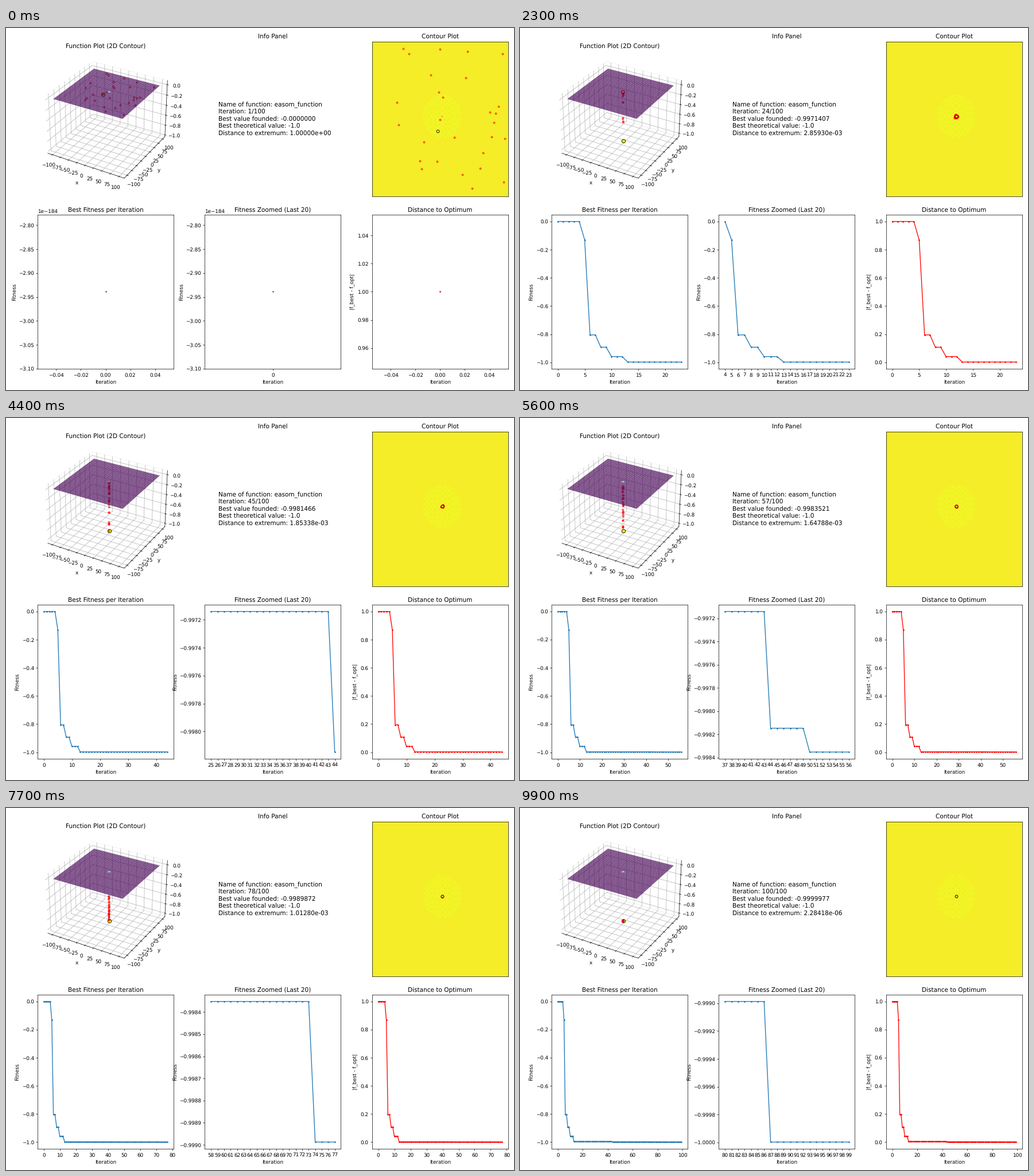
Animation of 885x632 px, one loop 10000 ms. Source, as a matplotlib script:

```python
import numpy as np
import matplotlib.pyplot as plt
from matplotlib.animation import FuncAnimation

plt.rcParams["text.hinting"] = "none"

W, H, DPI = 885, 632, 63.2
STEPS, SIZE = 100, 29
OPT = np.array([np.pi, np.pi])


def easom(x, y):
    return -np.cos(x) * np.cos(y) * np.exp(-((x - np.pi) ** 2 + (y - np.pi) ** 2))


def padded(lo, hi):
    pad = (0.05 + 1.1 / 48) * (hi - lo)
    return lo - pad, hi + pad


# Best fitness so far: nearly zero at first, then a falling staircase.
best = np.empty(STEPS)
best[:5] = -2.939e-184 ** (1 / np.arange(1, 6) ** 2)
best[1] = best[0]
for start, gap in [(5, 0.8697), (6, 0.1955), (8, 0.108), (10, 0.0415),
                   (13, 2.8593e-3), (44, 1.85338e-3), (50, 1.64788e-3),
                   (74, 1.0128e-3), (87, 2.28418e-6)]:
    best[start:] = gap - 1
distance = np.abs(best + 1)

rng = np.random.default_rng(4)
swarm = rng.uniform(-98, 98, (SIZE, 2))
rho = rng.uniform(0.12, 1, SIZE)
phase = rng.uniform(0, 2 * np.pi, SIZE)
speed = rng.normal(0, 0.5, SIZE)


def best_point(k):
    r = np.sqrt(-np.log(-best[k]))
    return OPT + r * np.array([-0.333, -0.943])


def population(k):
    """Scattered start that shrinks into orbits around the optimum."""
    radius = np.exp(np.interp(k, [0, 13, 86, 99], np.log([75, 4, 0.55, 0.03])))
    angle = phase + speed * k
    orbit = (radius * rho)[:, None] * np.c_[np.cos(angle), np.sin(angle)]
    keep = np.exp(-k / 3)
    pts = OPT + keep * (swarm - OPT) + (1 - keep) * orbit
    if k == 0 or best[k] != best[k - 1]:
        pts[0] = best_point(k)
    return pts


grid = np.linspace(-100, 100, 100)
X, Y = np.meshgrid(grid, grid)
Z = easom(X, Y)

fig = plt.figure(figsize=(14.0032, 10), dpi=DPI)
fig.subplots_adjust(left=55 / W, right=874.85 / W, bottom=1 - 595.45 / H,
                    top=1 - 23.58 / H, wspace=0.2293, hspace=0.1186)

ax3d = fig.add_subplot(2, 3, 1, projection="3d")
ax3d.set_title("Function Plot (2D Contour)")
ax3d.plot_surface(X, Y, Z, cmap="viridis", alpha=0.74, linewidth=0)
ticks = np.arange(-100, 101, 25)
ax3d.set(xlabel="x", ylabel="y", xticks=ticks, yticks=ticks,
         xlim=padded(-100, 100), ylim=padded(-100, 100))
for axis in (ax3d.xaxis, ax3d.yaxis, ax3d.zaxis):
    axis.pane.fill = False

info = fig.add_subplot(2, 3, 2)
info.set_title("Info Panel")
info.axis("off")
note = info.text(0.1, 0.5, "", fontsize=12, va="center", transform=info.transAxes)

flat = fig.add_subplot(2, 3, 3)
flat.set_title("Contour Plot")
flat.contourf(X, Y, Z, levels=50, cmap="plasma")
flat_dots = flat.scatter([], [], c="red", s=13, alpha=0.5)
flat_best = flat.scatter([], [], c="yellow", edgecolors="black", s=30)
flat.set(xlim=(-100, 100), ylim=(-100, 100), xticks=[], yticks=[])


def curve(pos, title, ylabel, color):
    ax = fig.add_subplot(2, 3, pos)
    ax.set(title=title, xlabel="Iteration", ylabel=ylabel)
    line, = ax.plot([], [], color=color, marker="o", markersize=2)
    return line


fitness = curve(4, "Best Fitness per Iteration", "Fitness", "C0")
zoom = curve(5, "Fitness Zoomed (Last 20)", "Fitness", "C0")
error = curve(6, "Distance to Optimum", "|f_best - f_opt|", "red")
cloud = []


def redraw(line, x, y):
    line.set_data(x, y)
    line.axes.relim()
    line.axes.autoscale_view()


def update(k):
    pts, top = population(k), best_point(k)
    z = np.maximum(easom(*pts.T), best[k])

    while cloud:
        cloud.pop().remove()
    cloud.append(ax3d.scatter(*pts.T, z, c="red", s=13, alpha=0.5))
    cloud.append(ax3d.scatter(*top[:, None], [best[k]], c="yellow",
                              edgecolors="black", s=50))
    ax3d.set_zlim(*padded(min(Z.min(), best[k]), Z.max()))

    flat_dots.set_offsets(pts)
    flat_best.set_offsets([top])

    note.set_text("Name of function: easom_function\n"
                  f"Iteration: {k + 1}/{STEPS}\n"
                  f"Best value founded: {best[k]:.7f}\n"
                  "Best theoretical value: -1.0\n"
                  f"Distance to extremum: {distance[k]:.5e}")

    done = np.arange(k + 1)
    last = done[-20:]
    zoom.axes.set_xticks(last)
    redraw(fitness, done, best[done])
    redraw(zoom, last, best[last])
    redraw(error, done, distance[done])
    return []


anim = FuncAnimation(fig, update, frames=STEPS, init_func=lambda: update(0),
                     interval=100, repeat=True, repeat_delay=0, blit=False)
plt.show()
```
